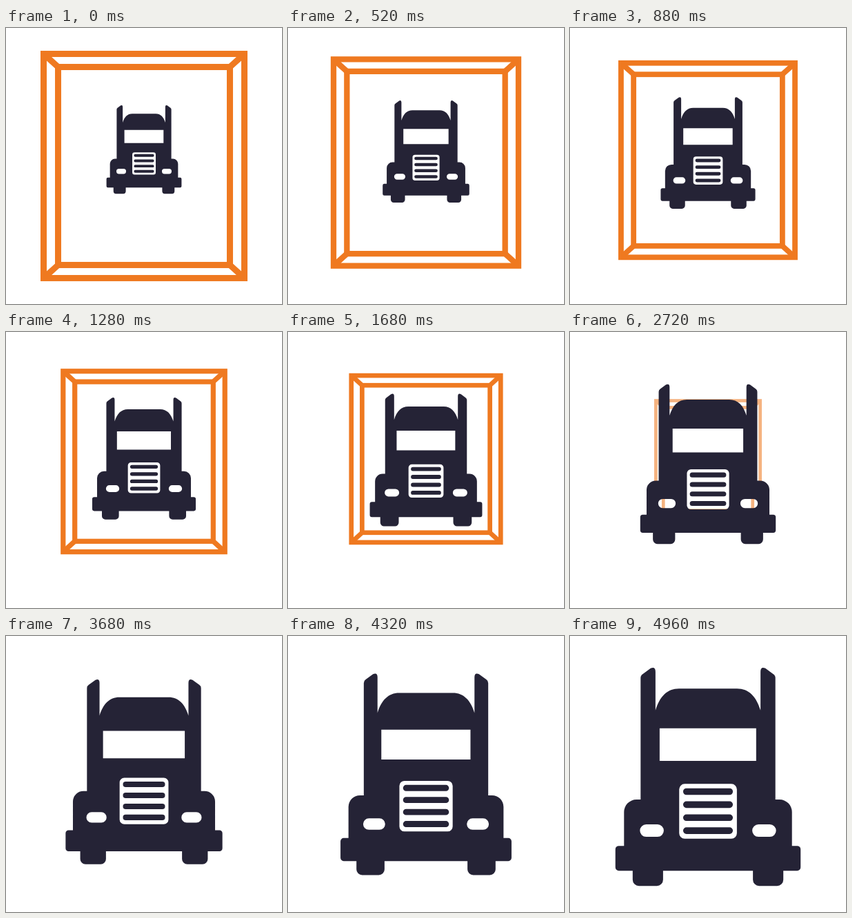
These frames come from a looping animation (400x400 px, 5000 ms). An HTML page:

```html
<!DOCTYPE html>
<html lang="en">
<head>
<meta charset="utf-8">
<title>Truck approaching</title>
<style>
  html, body { margin: 0; width: 100%; height: 100%; overflow: hidden; background: #fff; }
  svg { display: block; width: 100%; height: 100%; }
</style>
</head>
<body>
<svg viewBox="0 0 400 400">
  <g id="frame" fill="none" stroke="#ef7920" stroke-width="9">
    <rect x="-145.5" y="-162.5" width="291" height="325"/>
    <rect x="-124.5" y="-143.5" width="249" height="287"/>
    <path d="M-145.5-162.5l21 19M145.5-162.5l-21 19M-145.5 162.5l21-19M145.5 162.5l-21-19"/>
  </g>
  <path id="truck" fill="#252336" fill-rule="evenodd"/>
</svg>
<script>
const LOOP = 5000;
const frame = document.getElementById('frame');
const truck = document.getElementById('truck');

// Rounded rectangle from edges, with separate top and bottom radii.
function box(l, t, r, b, top = 0, bottom = top) {
  const arc = (q, x, y) => q ? `a${q} ${q} 0 0 1 ${x} ${y}` : '';
  return `M${l + top} ${t}H${r - top}${arc(top, top, top)}V${b - bottom}` +
    `${arc(bottom, -bottom, bottom)}H${l + bottom}${arc(bottom, -bottom, -bottom)}` +
    `V${t + top}${arc(top, top, -top)}Z`;
}

const hull =
  'M102.5 237V61Q102.5 57.5 105.5 55.5L117 47Q124 44 124 52V108' +
  'C130 88 141 76.5 158 76.5H242C259 76.5 270 88 276 108' +
  'V52Q276 44 283 47L294.5 55.5Q297.5 57.5 297.5 61V237' +
  'H303.5A18 18 0 0 1 321.5 255V304H329A5 5 0 0 1 334 309V335A5 5 0 0 1 329 340' +
  'H309V353A9 9 0 0 1 300 362H274A9 9 0 0 1 265 353V340' +
  'H135V353A9 9 0 0 1 126 362H100A9 9 0 0 1 91 353V340' +
  'H71A5 5 0 0 1 66 335V309A5 5 0 0 1 71 304H78.5V255A18 18 0 0 1 96.5 237Z';

const slats = [225.5, 244.3, 263.2, 282].map(y => box(164, y - 4.8, 236, y + 4.8, 4.8));

truck.setAttribute('d', [
  hull,
  box(130, 134, 269.7, 181),
  box(101.5, 273, 136, 291, 9),
  box(264, 273, 298.5, 291, 9),
  box(158.3, 214.3, 241.8, 293.7, 8),
  ...slats
].join(''));

const clamp = v => Math.min(1, Math.max(0, v));
const span = (t, a, b) => clamp((t - a) / (b - a));

function draw(t) {
  // The frame recedes upward, then shrinks faster in place and fades.
  const first = span(t, 0, 1667), second = span(t, 1667, 3333);
  const size = 1 - 0.253 * first - 0.359 * second;
  frame.setAttribute('transform', `translate(200 ${200 - 16 * first}) scale(${size})`);
  frame.setAttribute('opacity', 1 - span(t, 2250, 3333));

  // The truck grows at a steady rate.
  const grow = (109.2 + 0.0323 * t) / 269;
  truck.setAttribute('transform',
    `translate(200 ${176 + 0.0056 * t}) scale(${grow}) translate(-200 -203.8)`);
}

const start = performance.now();
function tick() {
  draw((performance.now() - start) % LOOP);
  requestAnimationFrame(tick);
}
draw(0);
requestAnimationFrame(tick);
</script>
</body>
</html>
```
